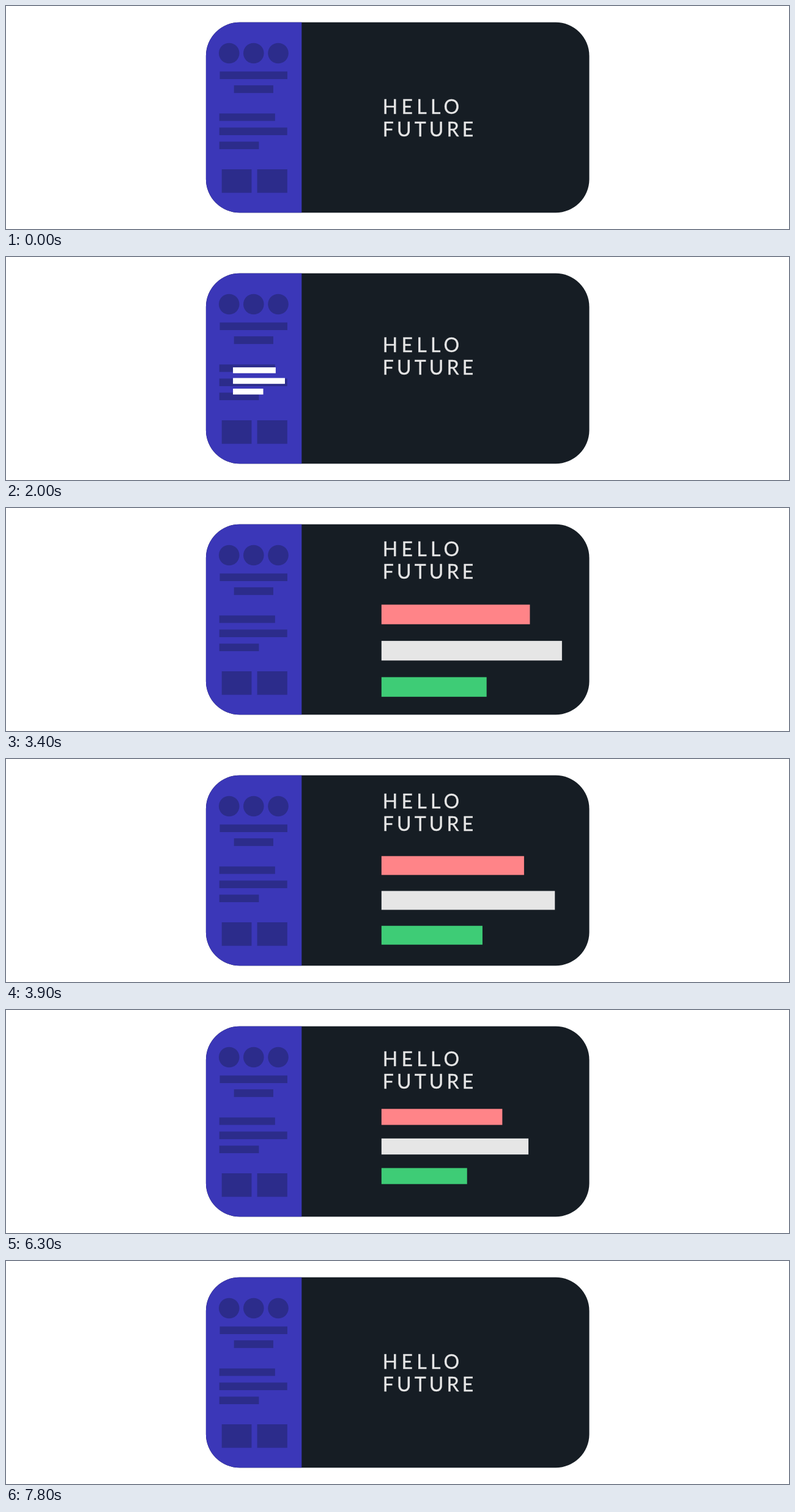
Animation of 1280 by 366 pixels, one loop 8 s. Source, as an HTML page:

```html
<!DOCTYPE html>
<html lang="en">
<head>
<meta charset="utf-8">
<title>Hello future</title>
<style>
  html, body { margin: 0; width: 100%; height: 100%; overflow: hidden; background: #fff; }
  svg { display: block; width: 100vw; height: 100vh; }
  text { font: 400 32px Lato, "Open Sans", sans-serif; fill: #e6e6e6; stroke: #e6e6e6; stroke-width: .35px; }
</style>
</head>
<body>
<svg viewBox="0 0 1280 366">
  <defs>
    <clipPath id="card"><rect x="326.9" y="26.8" width="626.6" height="312.4" rx="55"/></clipPath>
  </defs>
  <g clip-path="url(#card)">
    <rect x="320" y="20" width="640" height="326" fill="#161d24"/>
    <rect x="320" y="20" width="163.3" height="326" fill="#3b37b8"/>
    <g fill="#2c2c8b">
      <circle cx="364.7" cy="77.5" r="16.8"/>
      <circle cx="404.8" cy="77.5" r="16.8"/>
      <circle cx="445" cy="77.5" r="16.8"/>
      <rect x="349.5" y="107.5" width="110.5" height="12.5"/>
      <rect x="372.7" y="130.2" width="64.3" height="12.6"/>
      <rect x="348.7" y="176.4" width="91.1" height="12.2"/>
      <rect x="348.7" y="199.5" width="111" height="12.5"/>
      <rect x="348.7" y="222.6" width="64.7" height="12.4"/>
      <rect x="352.7" y="268" width="48.8" height="38.6"/>
      <rect x="410.6" y="268" width="49.2" height="38.6"/>
    </g>
    <g id="title">
      <text x="615.7" y="177.2" letter-spacing="6.3">HELLO</text>
      <text x="615.7" y="214.2" letter-spacing="5.2">FUTURE</text>
    </g>
    <g id="bars"><rect/><rect/><rect/></g>
  </g>
</svg>
<script>
const LOOP = 8000, STEP = 100, LAST = 7800;
const title = document.getElementById('title');
const barGroup = document.getElementById('bars');
const bars = [...barGroup.children];
const widths = [70.3, 85.5, 49.8];
const white = [255, 255, 255];
const tints = [[255, 132, 136], [230, 230, 230], [62, 204, 118]];

const clamp = v => Math.min(1, Math.max(0, v));
const ease = (t, start, end) => (1 - Math.cos(Math.PI * clamp((t - start) / (end - start)))) / 2;
const mix = (a, b, p) => a + (b - a) * p;

function render(t) {
  const lift = ease(t, 100, 1000);
  const fly = ease(t, 1843, 2945);
  const grow = ease(t, 2750, 3250);
  const settle = ease(t, 3173, 5453);
  const drop = ease(t, 6400, 7893);

  const rise = 99 * ease(t, 1592, 2911) - 13 * settle - 86 * ease(t, 6200, 7762);
  title.setAttribute('transform', `translate(0 ${-rise})`);

  const scale = mix(1.18, 0.993, lift) + 2.474 * grow - 0.657 * settle;
  const x = mix(353, 358.5, lift) + 255.3 * fly;
  const y = mix(178, 182.1, lift) - 19.9 * fly - 3.7 * grow + 3.8 * settle + 200 * drop;
  barGroup.setAttribute('opacity', t < LAST ? clamp(t / 600) : 0);

  bars.forEach((bar, i) => {
    const color = white.map((c, k) => Math.round(mix(c, tints[i][k], grow)));
    bar.setAttribute('x', x);
    bar.setAttribute('y', y + i * (17.1 * scale + 0.5));
    bar.setAttribute('width', widths[i] * scale);
    bar.setAttribute('height', 9.2 * scale + 0.45);
    bar.setAttribute('fill', `rgb(${color})`);
  });
}

const origin = performance.now();
function tick() {
  const t = (performance.now() - origin) % LOOP;
  render(Math.min(LAST, Math.floor(t / STEP) * STEP));
  requestAnimationFrame(tick);
}
tick();
</script>
</body>
</html>
```
